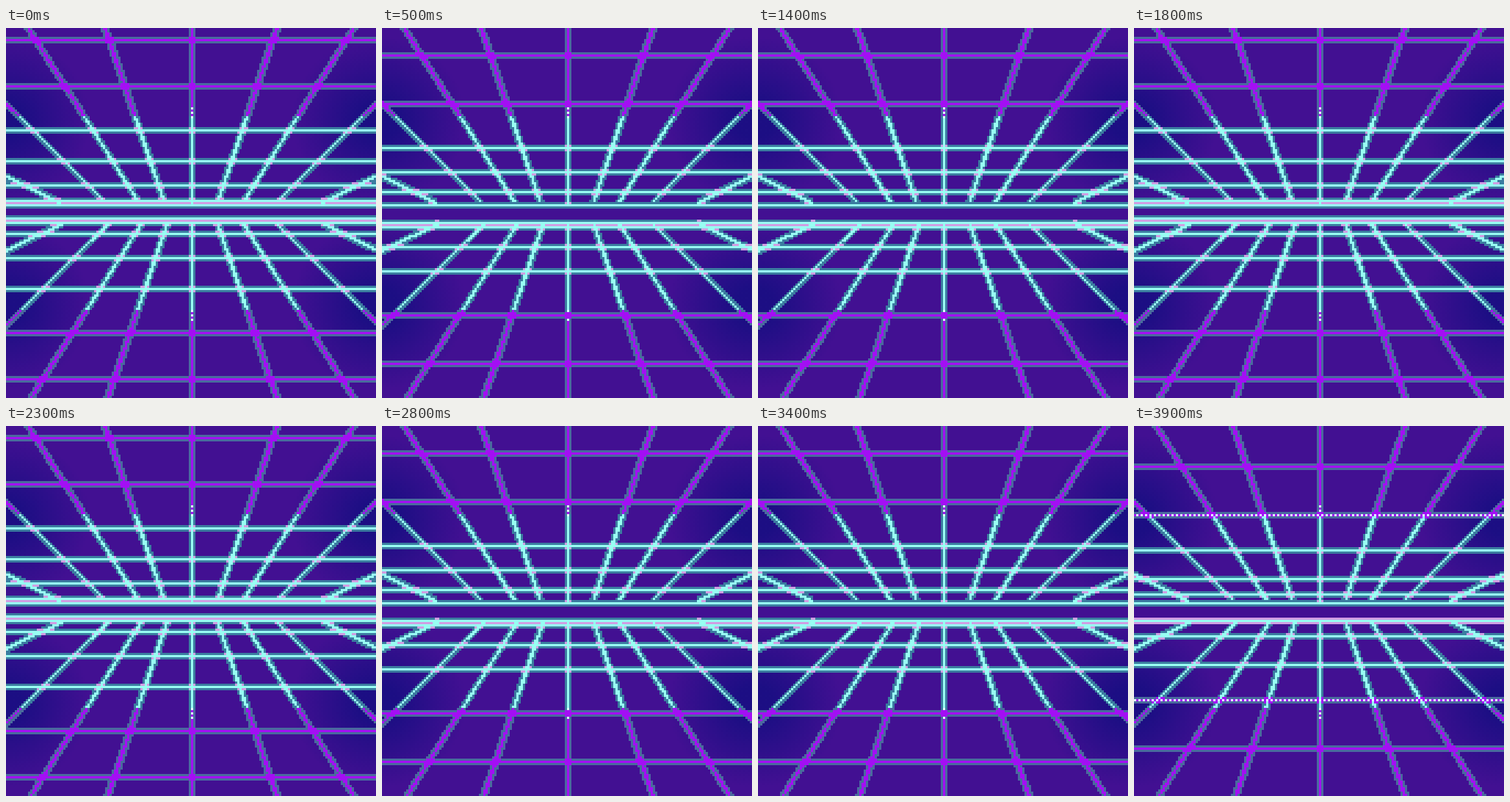
Write an HTML page with a canvas that moves like this. It is 504x504 px and loops after 4000 ms.

```html
<!DOCTYPE html>
<html lang="en">
<head>
<meta charset="utf-8">
<title>Neon grid</title>
<style>
  html, body { margin: 0; width: 504px; height: 504px; overflow: hidden; background: #421092; }
  canvas { display: block; width: 504px; height: 504px; image-rendering: pixelated; }
</style>
</head>
<body>
<canvas id="stage" width="168" height="168"></canvas>
<script>
const SIZE = 168, MID = 84;
const TOP = 80, BOTTOM = SIZE - TOP;  // edges of the empty horizon band
const FADE = 40;                      // row where violet turns to cyan
const STEP = 100, CYCLE = 20;         // ms per step, steps per cycle
const POSES = 3;                      // steps until a line reaches its neighbour
const BASE = '#421092', DARK = '24,14,130', DOT = '#e0fcff';
const CYAN = { core: '#98fff2', edge: '#3b7ca0', cross: '#cf9ee2' };
const VIOLET = { core: '#a30ff4', edge: '#4a6a9e', cross: '#a30ff4' };

// Distance of a receding line from the horizon, step by step
const track = [2, 4, 6, 9, 11, 15, 20, 24, 26, 34, 40, 46, 54, 62, 68, 75];

// Spokes: distance from the middle at the horizon, and slope
const spokes = [[12, 0.34], [23.5, 0.635], [38.5, 1.006], [59, 2.05]];

const tone = depth => depth < FADE ? VIOLET : CYAN;

// Collects cells; edges that overlap glow in the cross colour, cores lie on top
function makeGrid(g) {
  const used = new Uint8Array(SIZE * SIZE);
  const cores = [];
  const put = (x, y, color) => {
    g.fillStyle = color;
    g.fillRect(x, y, 1, 1);
  };
  return {
    edge(x, y, t) {
      if (x < 0 || y < 0 || x >= SIZE || y >= SIZE) return;
      const i = y * SIZE + x;
      put(x, y, used[i] ? t.cross : t.edge);
      used[i] = 1;
    },
    core(x, y, color) {
      cores.push([x, y, color]);
    },
    finish() {
      cores.forEach(c => put(...c));
    }
  };
}

function addLine(grid, y, depth) {
  for (let x = 0; x < SIZE; x++) {
    const dotted = depth === FADE && (x + (y < MID)) % 2 === 0;
    const t = depth === FADE ? VIOLET : tone(depth);
    grid.edge(x, y - 1, t);
    grid.edge(x, y + 1, t);
    grid.core(x, y, dotted ? DOT : t.core);
  }
}

function addPost(grid) {
  for (let y = 0; y < SIZE; y++) {
    const depth = Math.min(y, SIZE - y);
    if (depth > TOP) continue;
    const t = tone(depth);
    const dotted = depth >= FADE - 4 && depth <= FADE && depth % 2 === 0;
    grid.edge(MID - 1, y, t);
    grid.edge(MID + 1, y, t);
    grid.core(MID, y, dotted ? DOT : t.core);
  }
}

// Fills a short run of cells across a spoke, either along x or along y
function addRun(grid, pos, along, flat, t) {
  const from = Math.floor(pos - 1.5), to = Math.floor(pos + 1.5);
  for (let p = from; p <= to; p++) {
    const [x, y] = flat ? [along, p] : [p, along];
    if (Math.abs(p + 0.5 - pos) < 0.75) grid.core(x, y, t.core);
    else grid.edge(x, y, t);
  }
}

function addSpoke(grid, [near, slope], side, lower) {
  const shift = lower && side < 0 ? 1.3 : 0;
  if (slope > 1.5) {
    for (let x = 0; x < SIZE; x++) {
      const rise = ((x + 0.5 - shift - MID) * side - near) / slope;
      if (rise < 0) continue;
      const y = lower ? BOTTOM + 0.5 + rise : TOP - 0.5 - rise;
      addRun(grid, y, x, true, CYAN);
    }
    return;
  }
  for (let i = 0; i < TOP - 1; i++) {
    const y = lower ? SIZE - 1 - i : i;
    const x = MID + shift + side * (near + slope * (TOP - 1 - i));
    addRun(grid, x, y, false, tone(i));
  }
}

function addShade(g, x, y) {
  const r = 38;
  const shade = g.createRadialGradient(x, y, 0, x, y, r);
  shade.addColorStop(0.2, `rgba(${DARK},.9)`);
  shade.addColorStop(1, `rgba(${DARK},0)`);
  g.fillStyle = shade;
  g.fillRect(x - r, y - r, 2 * r, 2 * r);
}

function makePose(_, phase) {
  const layer = document.createElement('canvas');
  layer.width = layer.height = SIZE;
  const g = layer.getContext('2d');
  g.fillStyle = BASE;
  g.fillRect(0, 0, SIZE, SIZE);
  for (const x of [0, SIZE]) for (const y of [42, SIZE - 42]) addShade(g, x, y);

  const grid = makeGrid(g);
  for (const side of [-1, 1]) {
    for (const lower of [false, true]) {
      spokes.forEach(s => addSpoke(grid, s, side, lower));
    }
  }
  addPost(grid);
  track.filter((d, i) => i % POSES === phase).forEach(d => {
    addLine(grid, TOP - d, TOP - d);
    addLine(grid, MID + d, TOP - d);
  });
  addLine(grid, TOP, TOP);
  addLine(grid, BOTTOM, TOP);
  grid.finish();
  return layer;
}

const ctx = document.getElementById('stage').getContext('2d');
const poses = Array.from({ length: POSES }, makePose);
const start = performance.now();

function draw(now) {
  const step = Math.floor(Math.max(0, now - start) / STEP) % CYCLE;
  ctx.drawImage(poses[step % POSES], 0, 0);
  requestAnimationFrame(draw);
}
draw(start);
</script>
</body>
</html>
```
